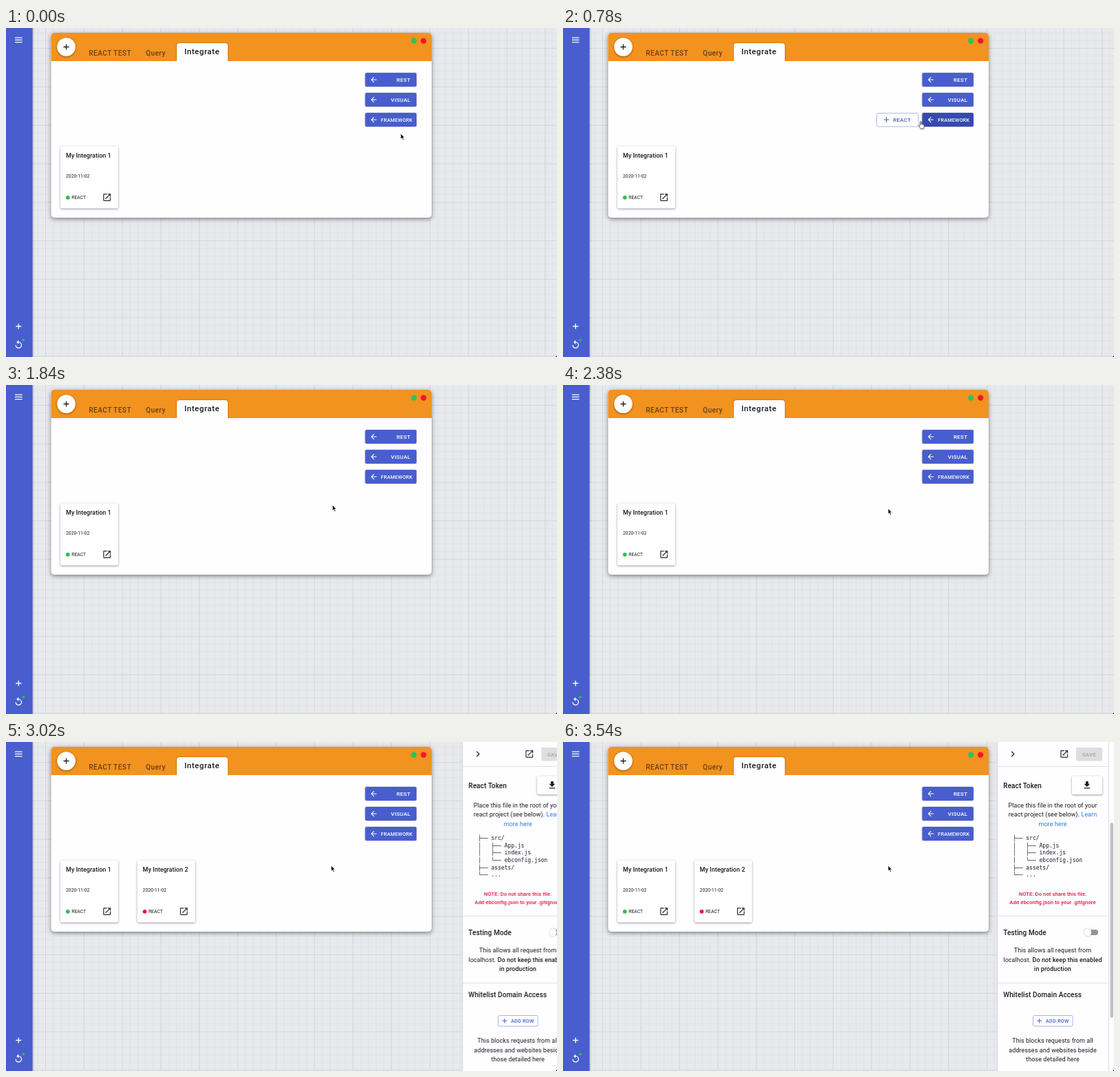
These frames come from a looping animation (800x477 px, 3560 ms). An HTML page:

```html
<!DOCTYPE html>
<html lang="en">
<head>
<meta charset="utf-8">
<title>Integrate</title>
<style>
html, body { margin: 0; width: 100%; height: 100%; overflow: hidden; background: #e7e9ed; }
svg { display: block; }
text { font-family: Roboto, sans-serif; fill: #1c1c1e; white-space: pre; }

.tab { font-size: 10px; font-weight: 500; letter-spacing: .5px; fill: #68400f; }
.tab.on { font-size: 11.5px; letter-spacing: .55px; fill: #1c1c1e; }
.name { font-size: 9px; font-weight: 500; }
.small { font-size: 6.8px; }
.label { font-size: 8px; font-weight: 500; letter-spacing: .25px; fill: #fff; }
.label.tight { font-size: 7.2px; }
.label.blue { fill: #5264b4; }
.label.off { fill: #a4a4a6; }
.end { text-anchor: end; }
.tip { font-size: 5.8px; font-weight: 500; fill: #fff; }
.head { font-size: 10px; font-weight: 500; letter-spacing: .1px; }
.body text { font-size: 9px; letter-spacing: .07px; text-anchor: middle; }
.body .note { font-size: 7.7px; font-weight: 500; fill: #dc1a3c; }
.strong { font-weight: 500; }
.link { fill: #2a7de1; }
.tree text { font: 8px "DejaVu Sans Mono", monospace; }

.btn { fill: #485ecf; }
.line { fill: none; stroke: #fff; stroke-width: 1.3; }
.ink { stroke: #1c1c1e; }
.rule { stroke: #e0e0e3; }
.lift { filter: drop-shadow(0 1px 1.5px rgba(0,0,0,.4)); }
.window { filter: drop-shadow(0 2px 3px rgba(0,0,0,.45)); }
.soft { filter: drop-shadow(0 .5px .8px rgba(0,0,0,.3)); }

.anim { animation: 3560ms linear infinite; }
.cursor { animation-name: move; animation-timing-function: ease-in-out; }
.arrow { animation-name: arrow; animation-timing-function: step-end; }
.hand { animation-name: hand; animation-timing-function: step-end; }
.framework { animation-name: framework; }
.option { animation-name: option; }
.option rect { animation-name: hover; }
.tooltip { animation-name: tooltip; }
.second { animation-name: second; animation-timing-function: step-end; }
.panel { animation-name: slide; }

@keyframes move {
  0% { transform: translate(573px, 153px); }
  5.6%, 15.7% { transform: translate(564px, 136px); }
  27%, 42.1% { transform: translate(488.5px, 135px); }
  48.3%, 51.7% { transform: translate(474px, 174px); }
  59%, 100% { transform: translate(472px, 179px); }
}
@keyframes arrow { 0% { opacity: 1; } 3% { opacity: 0; } 44.2%, 100% { opacity: 1; } }
@keyframes hand { 0% { opacity: 0; } 3% { opacity: 1; } 44.2%, 100% { opacity: 0; } }
@keyframes framework {
  0%, 3% { fill: #485ecf; }
  6.5%, 21% { fill: #2d3fa5; }
  24%, 100% { fill: #485ecf; }
}
@keyframes option {
  0%, 8.5% { opacity: 0; }
  11.8%, 42.5% { opacity: 1; }
  45.5%, 100% { opacity: 0; }
}
@keyframes hover {
  0%, 22.5% { fill: #fefdff; stroke: #b3bbdf; }
  25.5%, 44% { fill: #f2f4fc; stroke: #7f8cc6; }
  46%, 100% { fill: #fefdff; stroke: #b3bbdf; }
}
@keyframes tooltip {
  0%, 28% { opacity: 0; }
  30.3%, 42.1% { opacity: 1; }
  44.4%, 100% { opacity: 0; }
}
@keyframes second { 0% { opacity: 0; } 83.7%, 100% { opacity: 1; } }
@keyframes slide {
  0% { transform: translateX(172px); }
  83.29% { transform: translateX(172px); animation-timing-function: cubic-bezier(0, 0, .2, 1); }
  86.66%, 100% { transform: none; }
}
</style>
</head>
<body>
<svg width="800" height="477" viewBox="0 0 800 477">
  <defs>
    <pattern id="minor" width="11.16" height="11.16" x="57" y="29" patternUnits="userSpaceOnUse">
      <path d="M.5 0V11.16M0 .5H11.16" stroke="#dee1e5" fill="none"/>
    </pattern>
    <pattern id="major" width="55.8" height="55.8" x="57" y="29" patternUnits="userSpaceOnUse">
      <path d="M.5 0V55.8M0 .5H55.8" stroke="#d3d6db" fill="none"/>
    </pattern>
    <path id="back" d="M8 -1H-4.17L1.42 -6.59 0 -8-8 0 0 8 1.41 6.59-4.17 1H8z" transform="scale(.52)"/>
    <path id="plus" d="M-4 0H4M0-4V4"/>
    <path id="open" transform="scale(.6) translate(-12 -12)" d="M19 19H5V5h7V3H5c-1.11 0-2 .9-2 2v14c0 1.1.89 2 2 2h14c1.1 0 2-.9 2-2v-7h-2v7zM14 3v2h3.59l-9.83 9.83 1.41 1.41L19 6.41V10h2V3h-7z"/>
    <g id="card">
      <rect class="lift" x="79" y="171.5" width="84" height="90" rx="2" fill="#fff"/>
      <text class="small" x="87" y="217">2020-11-02</text>
      <text class="small" x="95.3" y="248.3">REACT</text>
      <use href="#open" x="146.6" y="245.6" fill="#2a2a2c"/>
    </g>
  </defs>

  <rect width="800" height="477" fill="#e7e9ed"/>
  <rect width="800" height="477" fill="url(#minor)"/>
  <rect width="800" height="477" fill="url(#major)"/>

  <g>
    <rect width="38.5" height="477" fill="#485ecf" style="filter: drop-shadow(1px 0 1px rgba(0,0,0,.25))"/>
    <path class="line" d="M13 14.2H23.6M13 17.4H23.6M13 20.6H23.6"/>
    <use class="line" href="#plus" x="18.3" y="432.5"/>
    <path fill="#fff" transform="translate(18.3 458.8) scale(.6) translate(-12 -11.5)" d="M12 5V1L7 6l5 5V7c3.31 0 6 2.69 6 6s-2.69 6-6 6-6-2.69-6-6H4c0 4.42 3.58 8 8 8s8-3.58 8-8-3.58-8-8-8z"/>
    <circle cx="25.2" cy="452.6" r="2" fill="#2fb84f"/>
  </g>

  <g class="window">
    <rect x="65.5" y="7" width="552.5" height="268" rx="5" fill="#fefdff"/>
    <path d="M65.5 48V12a5 5 0 0 1 5-5H613a5 5 0 0 1 5 5V48z" fill="#f2921f"/>
  </g>
  <path class="soft" d="M248 48V26a4 4 0 0 1 4-4H318a4 4 0 0 1 4 4V48z" fill="#fefdff"/>
  <rect x="246" y="48" width="78" height="3" fill="#fefdff"/>
  <circle class="lift" cx="87.5" cy="27.5" r="13.3" fill="#fff"/>
  <use class="line ink" href="#plus" x="87.5" y="27.5"/>
  <text class="tab" x="120.3" y="40">REACT TEST</text>
  <text class="tab" x="203" y="40">Query</text>
  <text class="tab on" x="259" y="38.3">Integrate</text>
  <circle cx="592.2" cy="18.6" r="4.2" fill="#2fc25b"/>
  <circle cx="606.2" cy="18.6" r="4.2" fill="#f3152f"/>

  <g class="soft">
    <rect class="btn" x="521.5" y="65" width="74.5" height="20" rx="2"/>
    <rect class="btn" x="521.5" y="94" width="74.5" height="20" rx="2"/>
    <rect class="btn anim framework" x="521.5" y="123" width="74.5" height="20" rx="2"/>
  </g>
  <g fill="#fff">
    <use href="#back" x="534" y="75"/>
    <use href="#back" x="534" y="104"/>
    <use href="#back" x="534" y="133"/>
  </g>
  <text class="label end" x="587.3" y="78">REST</text>
  <text class="label end" x="587.3" y="107">VISUAL</text>
  <text class="label tight end" x="590.4" y="135.5">FRAMEWORK</text>

  <g class="anim option">
    <rect class="anim" x="455.5" y="123.5" width="60.5" height="19.5" rx="2"/>
    <use href="#plus" x="469.5" y="133" stroke="#5264b4" stroke-width="1.1"/>
    <text class="label blue" x="479.2" y="136">REACT</text>
  </g>
  <g class="anim tooltip">
    <rect x="446.3" y="151" width="77.5" height="12" rx="2" fill="#646466"/>
    <text class="tip" x="485" y="159" text-anchor="middle">easybase-react integration</text>
  </g>

  <use href="#card"/>
  <text class="name" x="87" y="188">My Integration 1</text>
  <circle cx="89.8" cy="245.8" r="2.9" fill="#2fc04f"/>
  <g class="anim second">
    <use href="#card" x="111.6"/>
    <text class="name" x="198.6" y="188">My Integration 2</text>
    <circle cx="201.4" cy="245.8" r="2.9" fill="#ee1440"/>
  </g>

  <g class="anim panel">
    <rect x="631" width="172" height="477" fill="#fefdff"/>
    <path class="rule" d="M631 35.5H792M631 252H792M631 349.5H792M792.5 0V477"/>
    <path stroke="#d4d6da" d="M630.7 0V477"/>
    <rect x="794.5" y="117" width="4.5" height="283" rx="2.2" fill="#c0c0c3"/>

    <path class="line ink" d="M651.2 13.8 654.8 17.4 651.2 21"/>
    <use href="#open" x="727.7" y="17.4" fill="#2a2a2c"/>
    <rect x="745" y="8" width="38" height="19.5" rx="2" fill="#dededf"/>
    <text class="label off" x="764" y="20.6" text-anchor="middle">SAVE</text>

    <text class="head" x="639.3" y="66.8">React Token</text>
    <rect class="lift" x="739" y="49.5" width="44" height="26.5" rx="2" fill="#fff"/>
    <path fill="#1c1c1e" transform="translate(760.8 62.3) scale(.62) translate(-12 -11.5)" d="M19 9h-4V3H9v6H5l7 7 7-7zM5 18v2h14v-2H5z"/>

    <g class="body">
      <text x="711" y="94.6">Place this file in the root of your</text>
      <text x="711" y="108.1">react project (see below). <tspan class="link">Learn</tspan></text>
      <text class="link" x="711" y="121.5" style="fill: #2a7de1">more here</text>
      <text class="note" x="711" y="223">NOTE: Do not share this file.</text>
      <text class="note" x="711" y="234.8">Add ebconfig.json to your .gitignore</text>
      <text x="711" y="305">This allows all request from</text>
      <text x="711" y="318.5">localhost. <tspan class="strong">Do not keep this enabled</tspan></text>
      <text class="strong" x="711" y="332">in production</text>
      <text x="711" y="436">This blocks requests from all</text>
      <text x="711" y="449.5">addresses and websites beside</text>
      <text x="711" y="463">those detailed here</text>
    </g>
    <g class="tree">
      <text x="653" y="142.2">├── src/</text>
      <text x="653" y="152.8">│   ├── App.js</text>
      <text x="653" y="163.4">│   ├── index.js</text>
      <text x="653" y="174">│   └── ebconfig.json</text>
      <text x="653" y="184.6">├── assets/</text>
      <text x="653" y="195.2">└── ...</text>
    </g>

    <text class="head" x="639.3" y="280">Testing Mode</text>
    <rect x="758" y="272" width="19" height="8" rx="4" fill="#949496"/>
    <circle class="soft" cx="762" cy="276" r="5.4" fill="#fff"/>

    <text class="head" x="639.3" y="370">Whitelist Domain Access</text>
    <rect x="682.5" y="396.5" width="57.5" height="15.5" rx="2" fill="none" stroke="#a9b4e6"/>
    <use href="#plus" transform="translate(691.7 404.3) scale(.85)" stroke="#485ecf" stroke-width="1.2"/>
    <text class="label tight" x="701" y="406.9" style="fill: #485ecf">ADD ROW</text>
  </g>

  <path d="M800 475V477H798z" fill="#222"/>

  <g class="anim cursor">
    <path class="anim arrow" d="M0 0V8.2L1.9 6.5 3.2 9.5 4.6 8.9 3.3 6H5.8z" fill="#111" stroke="#fff" stroke-width=".7"/>
    <path class="anim hand" d="M-1 5.8V.9a.9.9 0 0 1 1.8 0V4L2 3.9 3.3 4.3 4.5 4.9 5 5.6V7.6L4.2 9.4V10.8H-.4L-1.2 9.2-3 6.9C-3.3 6-2.2 5.5-1.7 6.1z" fill="#fff" stroke="#111" stroke-width=".8" stroke-linejoin="round"/>
  </g>
</svg>
</body>
</html>
```
